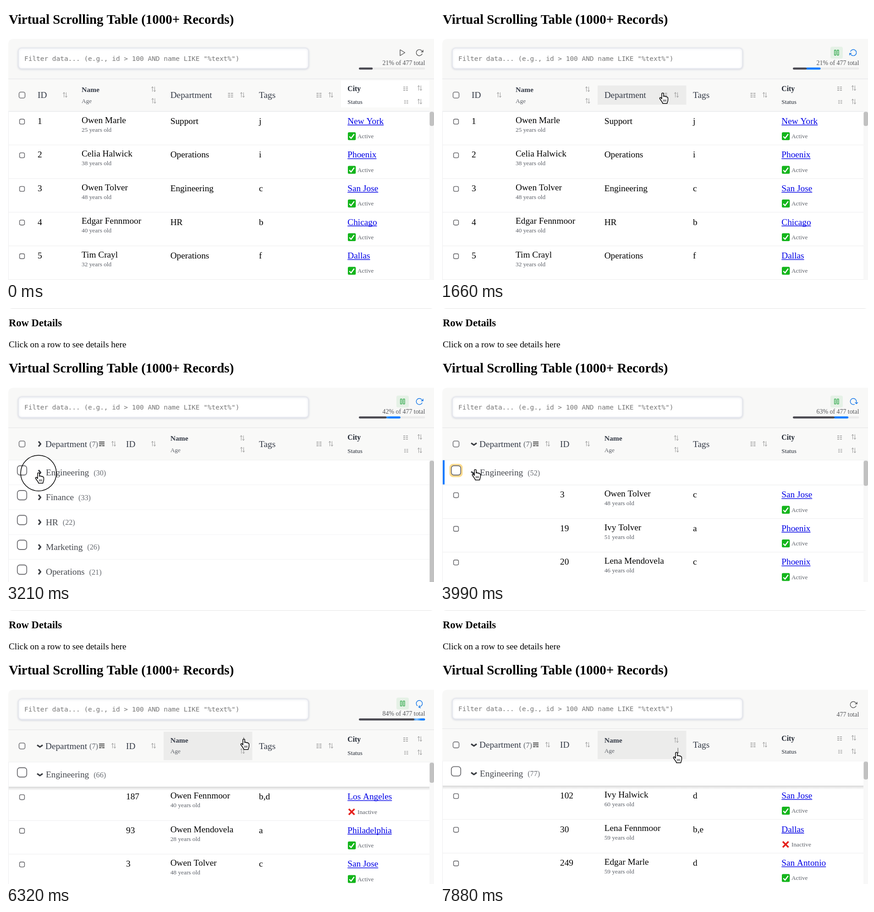
An HTML page with a canvas that plays this animation: 934 px wide and 599 px high, repeating every 7990 ms.

```html
<!DOCTYPE html>
<html lang="en">
<head>
<meta charset="utf-8">
<title>Virtual Scrolling Table</title>
<style>
  html, body { margin: 0; width: 100%; height: 100%; overflow: hidden; background: #fff; }
  canvas { display: block; width: 934px; height: 599px; }
</style>
</head>
<body>
<canvas id="stage" width="934" height="599"></canvas>
<script>
const g = document.getElementById('stage').getContext('2d');
const LOOP = 7990, SERIF = '"Liberation Serif", serif', CELL = 19.3;
const COL = [165, 358.7, 552, 745.3];
const PLAY = 620, GROUP = 2150, EXPAND = 3700, BLUR = 4650, MORE = 4850,
      SORT_NAME = 6000, DONE = 6600, SORT_AGE = 6950;

const row = (id, name, age, dept, tags, city, off) => ({ id, name, age, dept, tags, city, off });
const tolver = row(3, 'Owen Tolver', 48, 'Engineering', 'c', 'San Jose');
const ungrouped = [
  row(1, 'Owen Marle', 25, 'Support', 'j', 'New York'),
  row(2, 'Celia Halwick', 38, 'Operations', 'i', 'Phoenix'),
  tolver,
  row(4, 'Edgar Fennmoor', 40, 'HR', 'b', 'Chicago'),
  row(5, 'Tim Crayl', 32, 'Operations', 'f', 'Dallas')];
const byDefault = [tolver,
  row(19, 'Ivy Tolver', 51, '', 'a', 'Phoenix'),
  row(20, 'Lena Mendovela', 46, '', 'c', 'Phoenix')];
const byName = [
  row(187, 'Owen Fennmoor', 40, '', 'b,d', 'Los Angeles', true),
  row(93, 'Owen Mendovela', 28, '', 'a', 'Philadelphia'), tolver];
const byAge = [
  row(102, 'Ivy Halwick', 60, '', 'd', 'San Jose'),
  row(30, 'Lena Fennmoor', 59, '', 'b,e', 'Dallas', true),
  row(249, 'Edgar Marle', 59, '', 'd', 'San Antonio')];
const groups = [['Engineering', 30], ['Finance', 33], ['HR', 22], ['Marketing', 26], ['Operations', 21]];

// time, x, y of the pointer tip
const pointerPath = [[110, 900, 190], [500, 864, 102], [900, 864, 102], [1500, 486, 191],
  [2150, 486, 191], [2950, 71, 361], [3450, 71, 361], [3900, 77, 354], [4450, 77, 354],
  [5250, 517, 283], [6320, 519, 283], [6800, 516, 312]];
const clicks = [[500, 740], [1880, 2100], [3100, 3400], [5780, 5980], [6820, 6940]];
// time, turns of the refresh icon
const spinPath = [[PLAY, -.54], [1660, .5], [3210, 2], [3990, 3.13], [5430, 4.58], [6320, 5.3], [DONE, 5.58]];

function along(path, t, ease) {
  if (t <= path[0][0]) return path[0].slice(1);
  const i = path.findIndex(p => p[0] > t);
  if (i < 0) return path[path.length - 1].slice(1);
  const a = path[i - 1], b = path[i], k = ease((t - a[0]) / (b[0] - a[0]));
  return a.slice(1).map((v, j) => v + (b[j + 1] - v) * k);
}
const smooth = k => k * k * (3 - 2 * k), linear = k => k;

function text(s, x, y, size, color = '#000', weight = '', family = SERIF) {
  g.font = `${weight} ${size}px ${family}`;
  g.fillStyle = color;
  g.fillText(s, x, y);
}
function rect(x, y, w, h, color) { g.fillStyle = color; g.fillRect(x, y, w, h); }
function box(x, y, w, h, r, fill, stroke, lw = 1) {
  g.beginPath(); g.roundRect(x, y, w, h, r);
  if (fill) { g.fillStyle = fill; g.fill(); }
  if (stroke) { g.strokeStyle = stroke; g.lineWidth = lw; g.stroke(); }
}
function line(points, color, lw) {
  g.beginPath();
  points.forEach(([x, y]) => g.lineTo(x, y));
  g.strokeStyle = color; g.lineWidth = lw; g.stroke();
}
const checkbox = (x, y, size, lw = 1.6) =>
  box(x - size / 2, y - size / 2, size, size, size * .28, '#fff', '#6f6f73', lw);

function arrow(x, y, dir, h, color) {
  line([[x, y - h], [x, y + h]], color, 1);
  line([[x - 2.3, y + dir * (h - 3)], [x, y + dir * h], [x + 2.3, y + dir * (h - 3)]], color, 1);
}
function sortIcon(x, y, active) {
  if (active) return arrow(x + 3, y, 1, 6, '#555');
  arrow(x - 2.4, y, -1, 5.5, '#999');
  arrow(x + 2.4, y, 1, 5.5, '#999');
}
function groupIcon(x, y, w = 11) {
  const gap = w * .36;
  for (const dy of [-gap, 0, gap]) for (const dx of [-w / 2, .8])
    rect(x + dx, y + dy - .6, w / 2 - .8, w * .12, '#858585');
}
function activeGroupIcon(x, y) {
  rect(x - 6, y - 5, 12, 1.8, '#333');
  rect(x - 6, y - 1, 12, 1.8, '#333');
  rect(x - 6, y + 3, 5.3, 1.8, '#333');
  rect(x + .7, y + 3, 5.3, 1.8, '#333');
}
function chevron(x, y, open) {
  line(open ? [[x - 5.5, y - 2], [x + .5, y + 2.3], [x + 6.5, y - 2]]
            : [[x - 2.5, y - 5.5], [x + 2, y], [x - 2.5, y + 5.5]], '#3a3d42', 3.2);
}

const refreshShape = new Path2D('M23 4v6h-6M20.49 15a9 9 0 1 1-2.12-9.36L23 10');
function refresh(y, turns, color) {
  g.save();
  g.translate(902, y); g.rotate(turns * Math.PI * 2); g.scale(.74, .74); g.translate(-12, -12);
  g.strokeStyle = color; g.lineWidth = 1.9; g.stroke(refreshShape);
  g.restore();
}

function progress(t, y, loaded) {
  const w = 30.3, x = 770, edge = x + w * loaded;
  box(x, y, 144.5, 4.5, 2.2, '#ebebeb');
  if (t >= PLAY) {
    const next = Math.min(w, 914.5 - edge), grad = g.createLinearGradient(edge, 0, edge + next, 0);
    const centre = (t % 1000 / 1000 - .27) * 4;
    for (let i = 0; i <= 8; i++) {
      const k = Math.max(0, 1 - Math.abs(i / 8 - centre) / .45);
      grad.addColorStop(i / 8, `rgb(${k * 140},${122 + k * 75},255)`);
    }
    box(edge - 2, y, next + 2, 4.5, 2.2, grad);
  }
  box(x, y, w * loaded, 4.5, 2.2, '#4b4a52');
}

function toolbar(t, top, bottom, loaded) {
  const done = t >= DONE, lift = done ? -1 : 0;
  box(5, top, 940, bottom - top + 72, 10, '#f8f8f7');
  g.save();
  g.shadowColor = 'rgba(90,100,140,.2)'; g.shadowBlur = 4; g.shadowOffsetY = 1;
  box(27, top + 20 + lift, 633, 45, 7, '#fff', '#e4e6ed', 1.6);
  g.restore();
  text('Filter data... (e.g., id > 100 AND name LIKE "%text%")', 40, top + 48 + lift, 14.45,
    '#777', '', '"DejaVu Sans Mono", monospace');
  g.textAlign = 'right';
  const label = done ? '477 total' : `${loaded * 21}% of 477 total`;
  text(label, 914.5, top + (done ? 59 : 57), 13.9, '#55565a');
  g.textAlign = 'left';
  const iconY = top + 30;
  if (done) return refresh(iconY + 2.5, 0, '#555');
  const playing = t >= PLAY;
  if (playing) {
    box(852, iconY - 13, 27, 26, 4, '#e5f1e6');
    for (const x of [860.8, 866.8]) box(x, iconY - 5.5, 3.2, 11, .5, null, '#28a745', 1.3);
  } else {
    line([[860, iconY - 6.5], [870.5, iconY], [860, iconY + 6.5], [860, iconY - 6.5]], '#555', 1.4);
  }
  refresh(iconY, playing ? along(spinPath, t, linear)[0] : 0, playing ? '#1878e8' : '#555');
  progress(t, top + 62.5, loaded);
}

function header(t, mid, tip) {
  const grouped = t >= GROUP, open = t >= EXPAND, ink = '#343a46';
  const named = t >= SORT_NAME && t < SORT_AGE, aged = t >= SORT_AGE;
  rect(5, mid - 35.5, 929, 71, '#f9f9f8');
  rect(5, mid - 36, 929, 1.2, '#e6e7e9');
  if (t < 330) rect(731, mid - 32, 193, 59, '#fff');
  const half = !grouped ? 21 : named || aged ? 31 : 33;
  if (t > 110 && tip[0] > 344 && tip[0] < 537 && Math.abs(tip[1] - mid) < half)
    rect(344, mid - half, 193.5, half * 2, '#ececeb');
  checkbox(35, mid, 13);

  const label = (s, x) => text(s, x, mid + 6.3, CELL, ink);
  const idX = grouped ? 262 : 69, nameX = grouped ? COL[1] : COL[0];
  if (grouped) {
    chevron(73.5, mid, open);
    label('Department', 86);
    text('(7)', 182, mid + 6, 16.3, '#5c6068');
    activeGroupIcon(209, mid);
    sortIcon(235, mid - .5);
  } else {
    label('Department', COL[1]);
    groupIcon(490, mid);
    sortIcon(516, mid - .5);
  }
  label('ID', idX);
  sortIcon(grouped ? 322 : 129, mid - .5);
  const nameY = aged ? -10 : -12.5, ageY = named ? 11.7 : 13;
  text('Name', nameX, mid + nameY + 5.3, 15.6, ink, 'bold');
  text('Age', nameX, mid + ageY + 4.5, 13.3, '#5c6068');
  sortIcon(nameX + 157, mid + nameY - .5, named);
  sortIcon(nameX + 157.5, mid + ageY - .5, aged);
  label('Tags', COL[2]);
  groupIcon(683, mid);
  sortIcon(709, mid - .5);
  text('City', COL[3], mid - 9.3, 15.8, '#222833', 'bold');
  text('Status', COL[3], mid + 19.3, 13.3, '#222833');
  groupIcon(872, mid - 14, 10);
  sortIcon(903, mid - 15.5);
  groupIcon(873.3, mid + 15, 8.5);
  sortIcon(903, mid + 14);
  rect(5, mid + 35, 929, 1.2, '#e4e6e8');
}

function status(y, off) {
  if (off) {
    line([[748, y + 2.5], [760.5, y + 15]], '#e5211c', 3.6);
    line([[760.5, y + 2.5], [748, y + 15]], '#e5211c', 3.6);
  } else {
    box(746, y, 17.3, 17.3, 2.5, '#14b51c');
    line([[749.3, y + 9.3], [753, y + 13.3], [759.8, y + 4]], '#fff', 2.4);
  }
  text(off ? 'Inactive' : 'Active', 767, y + 13.2, 13.3, '#5c6068');
}
function dataRow(r, y, grouped) {
  const cell = (s, x, color) => text(s, x, y + 27.6, CELL, color);
  const nameX = grouped ? COL[1] : COL[0];
  checkbox(35, y + 22.5, 10.8);
  cell(r.id, grouped ? 262 : 69);
  text(r.name, nameX, y + 25.3, CELL);
  text(r.age + ' years old', nameX, y + 44.5, 13.35, '#5c6068');
  if (!grouped) cell(r.dept, COL[1]);
  cell(r.tags, COL[2]);
  cell(r.city, COL[3], '#0000e6');
  rect(COL[3], y + 29.2, g.measureText(r.city).width, 1.4, '#0000e6');
  status(y + 45.7, r.off);
  rect(5, y + 73, 919, 1, '#ededee');
}
function groupRow(name, count, y, open, focused) {
  rect(5, y, 919, 54, '#fff');
  if (focused) {
    rect(6, y, 4, 53, '#0a7aff');
    box(20.5, y + 8, 29, 29, 8, '#ffdc8f');
  }
  checkbox(35, y + 22.3, 20.5, 1.8);
  chevron(73.5, y + 27, open);
  text(name, 87, y + 33.3, CELL, '#44474d');
  const countX = 97 + g.measureText(name).width;
  text(`(${count})`, countX, y + 32.8, 16.2, '#666a70');
  rect(5, y + 53.7, 919, 1, '#e9eaeb');
}

function body(t, y) {
  if (t < GROUP) {
    ungrouped.forEach((r, i) => dataRow(r, y + i * 73.55, false));
  } else if (t < EXPAND) {
    groups.forEach(([name, count], i) => groupRow(name, count, y + i * 54.25, false));
  } else {
    const rows = t < SORT_NAME ? byDefault : t < SORT_AGE ? byName : byAge;
    rows.forEach((r, i) => dataRow(r, y + 54 + i * 73.55, true));
    groupRow('Engineering', t < MORE ? 52 : t < DONE ? 66 : 77, y, true, t < BLUR);
    if (t >= BLUR) {
      const shade = g.createLinearGradient(0, y + 54, 0, y + 62);
      shade.addColorStop(0, 'rgba(0,0,0,.14)');
      shade.addColorStop(1, 'rgba(0,0,0,0)');
      rect(5, y + 54, 919, 8, shade);
    }
  }
  rect(924, y, 10, 599 - y, '#f8f8f8');
  const thumb = t < GROUP ? 31 : t < EXPAND ? 290 : t < MORE ? 55 : t < DONE ? 44 : 39;
  box(924.5, y + 1, 9.5, thumb, 4, '#c1c1c1');
  rect(5, y, 1, 599 - y, '#eeeeef');
}

const handShape = new Path2D('M-2 1C-2-1.2 2-1.2 2 1V7C3 5.4 5.6 5.6 5.8 7.4C7 6.2 9 6.6 9.2 8.4C10.2 7.8 11.4 8.6 11.4 10.2V14.5C11.4 17.5 9.6 19 9.6 22H0C-.2 19.5-2.5 17.5-4 15L-6.5 11.5C-7.4 9.6-5 8.2-3.6 10L-2 12Z');
function pointer([x, y]) {
  g.save();
  g.translate(x, y);
  g.fillStyle = '#fff'; g.fill(handShape);
  g.strokeStyle = '#000'; g.lineWidth = 1.5; g.stroke(handShape);
  for (const dx of [1.8, 4.4, 7]) line([[dx, 13.5], [dx, 18]], '#000', 1);
  g.restore();
}

function draw(t) {
  g.lineJoin = 'round';
  rect(0, 0, 934, 599, '#fff');
  const shift = t < GROUP ? 0 : 102.4, shrink = t < DONE ? 0 : 2.3;
  const loaded = t < GROUP ? 1 : t < EXPAND ? 2 : t < MORE ? 3 : 4;
  const tip = along(pointerPath, t, smooth);
  if (shift) {
    box(5, -20, 929, 22, 9, '#f1f1f1');
    text('Row Details', 6, 40, 22.6, '#000', 'bold');
    text('Click on a row to see details here', 6, 85.7, CELL);
  }
  text('Virtual Scrolling Table (1000+ Records)', 6, 38.7 + shift, 28.95, '#000', 'bold');
  toolbar(t, 72 + shift, 159 + shift - shrink, loaded);
  const mid = 194.8 + shift - shrink;
  rect(0, mid + 35, 934, 599, '#fff');
  header(t, mid, tip);
  body(t, mid + 35.5);
  if (t < 110) return;
  pointer(tip);
  if (clicks.some(([from, to]) => t >= from && t < to)) {
    g.beginPath(); g.arc(tip[0], tip[1], 39, 0, Math.PI * 2);
    g.strokeStyle = '#000'; g.lineWidth = 1.5; g.stroke();
  }
}

function frame() {
  draw(performance.now() % LOOP);
  requestAnimationFrame(frame);
}
frame();
</script>
</body>
</html>
```
